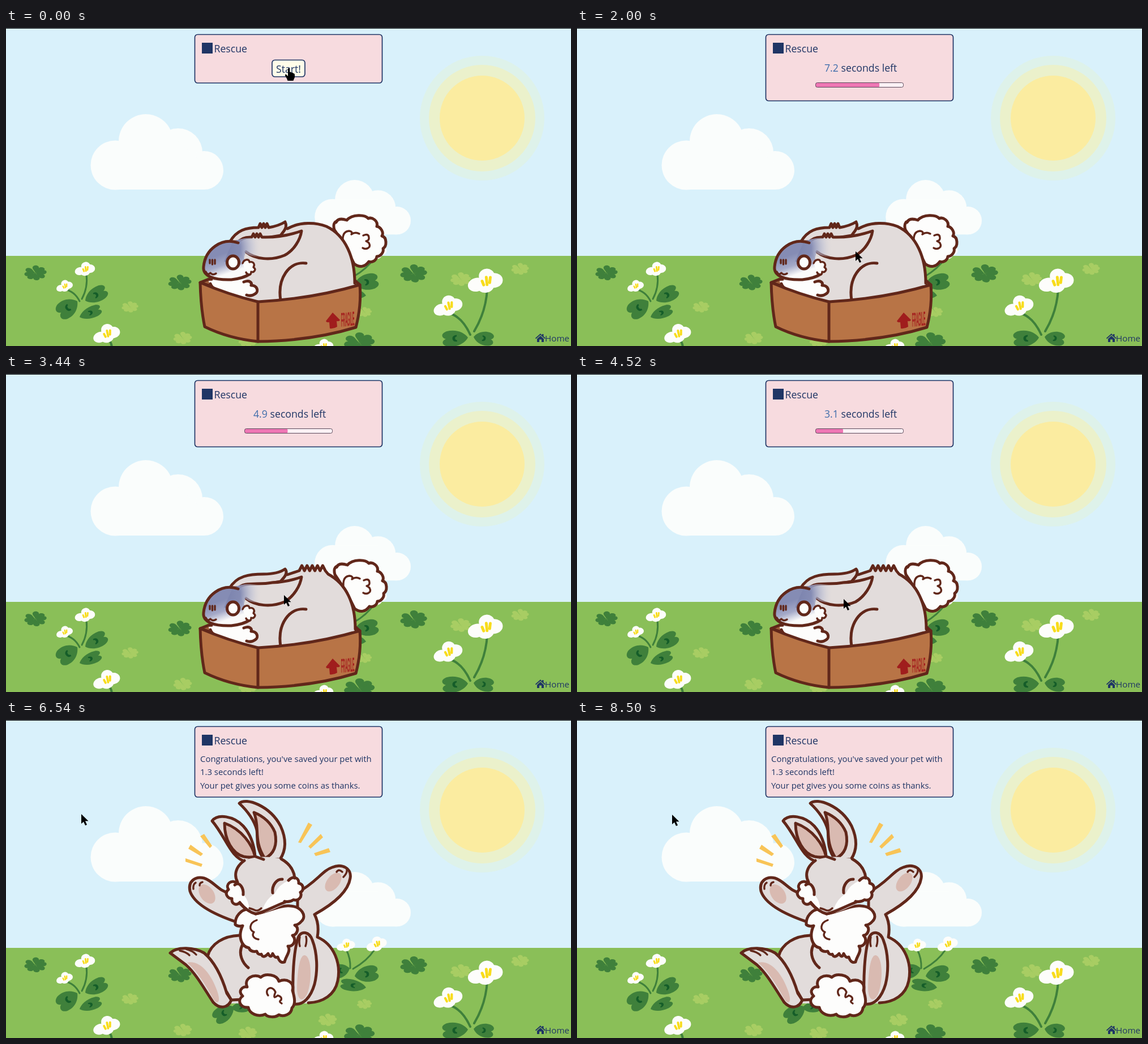
These frames come from a looping animation (998x561 px, 8560 ms). An HTML page:

```html
<!DOCTYPE html>
<html lang="en">
<head>
<meta charset="utf-8">
<title>Rescue</title>
<style>
html, body { margin: 0; width: 100%; height: 100%; overflow: hidden; background: #d9f1fb; }
svg { display: block; width: 998px; height: 561px; }
text { font-family: "Open Sans", "Noto Sans", sans-serif; font-size: 17.7px; fill: #1f3565; }
.small text { font-size: 14.9px; }
.ink, .ink path, .ink ellipse { stroke: #61271a; stroke-width: 5; stroke-linecap: round; stroke-linejoin: round; }
.ink .thin { stroke-width: 3.4; }
.ink .bare { stroke: none; }
.line { fill: none; }
.fur { fill: #e2dcdb; }
.white { fill: #fdfdfc; }
.pad { fill: #d9bab1; }
</style>
</head>
<body>
<svg viewBox="0 0 998 561">
  <defs>
    <g id="cloud" fill="#fafdfc">
      <circle cx="193" cy="242" r="43.5"/><circle cx="247" cy="200" r="48"/>
      <circle cx="304" cy="220" r="43"/><circle cx="350" cy="251" r="34"/>
      <path d="M193 200H304L350 240V285H193Z"/>
    </g>
    <path id="heart" d="M0 0C-4 -5 -11 -7 -9 -13C-7 -17 -1 -16 0 -12C1 -16 7 -17 9 -13C11 -7 4 -5 0 0Z"/>
    <path id="broad" d="M0 0C-6 -2 -11 -7 -9 -13C-7 -17 -2 -17 0 -14C2 -17 7 -17 9 -13C11 -7 6 -2 0 0Z"/>
    <g id="clover">
      <use href="#heart" transform="rotate(25)"/><use href="#heart" transform="rotate(105)"/>
      <use href="#heart" transform="rotate(195)"/><use href="#heart" transform="rotate(280)"/>
    </g>
    <g id="flower">
      <g fill="#fdfdfb">
        <ellipse cx="-16" cy="3" rx="15.5" ry="12" transform="rotate(-8)"/>
        <ellipse cx="16" cy="1" rx="15.5" ry="13"/>
        <ellipse cx="4" cy="-8" rx="14" ry="13"/>
        <ellipse cx="0" cy="9" rx="15" ry="12"/>
      </g>
      <path d="M-5 0L-3 7M3 -6V7M10 -5L8 4" fill="none" stroke="#f8dc1c" stroke-width="5" stroke-linecap="round"/>
    </g>
    <radialGradient id="blush" gradientUnits="userSpaceOnUse" cx="386" cy="388" r="66">
      <stop offset="0" stop-color="#7a82ad"/>
      <stop offset=".42" stop-color="#858cb4"/>
      <stop offset=".75" stop-color="#b9bdd3" stop-opacity=".5"/>
      <stop offset="1" stop-color="#e2dcdb" stop-opacity="0"/>
    </radialGradient>
    <linearGradient id="face" gradientUnits="userSpaceOnUse" x1="378" y1="400" x2="392" y2="440">
      <stop offset="0" stop-color="#858cb4"/>
      <stop offset=".45" stop-color="#a5aac8"/>
      <stop offset=".85" stop-color="#fafafa"/>
    </linearGradient>
  </defs>

  <rect width="998" height="561" fill="#d9f1fb"/>
  <g>
    <circle cx="841" cy="159" r="110" fill="#def2ea"/>
    <circle cx="841" cy="159" r="94" fill="#ebf1cb"/>
    <circle cx="841" cy="159" r="75" fill="#fbeca0"/>
  </g>
  <use href="#cloud"/>
  <use href="#cloud" transform="translate(437 158) scale(.724)"/>
  <rect y="402" width="998" height="159" fill="#8abf58"/>
  <g id="meadow"></g>

  <g id="boxed" class="ink">
    <g id="tail">
      <path class="white" d="M580 355C576 342 585 338 583 342C586 334 596 336 602 338C612 327 634 328 640 335C646 332 658 339 655 349C662 350 668 360 664 366C673 368 673 384 666 388C668 395 661 402 655 402C654 410 646 413 641 411C634 421 624 422 615 415L600 385Z"/>
      <path class="line thin" d="M595 374Q594 358 606 357Q613 358 610 363Q617 358 624 362M631 365Q640 361 641 368Q642 374 636 375Q644 378 642 385Q637 391 630 387"/>
    </g>
    <path d="M343 449L358 443L616 445L625 453L445 483Z" fill="#9b5d3a"/>
    <path class="fur bare" d="M397 378L435 365L497 354C522 342 548 343 566 350C600 366 616 405 616 455L600 475L440 485L360 455Z"/>
    <path id="back" class="line"/>
    <path class="line" d="M485 480C479 442 500 411 530 415"/>
    <path id="farEar" class="fur"/>
    <path class="white bare" d="M358 446L424 443Q434 447 433 453C448 456 446 470 432 473L400 476L361 460Z"/>
    <path class="line" d="M361 451Q363 457 369 460M420 448C430 444 435 449 433 454C444 454 447 465 440 469Q433 474 425 471"/>
    <path class="bare" d="M409 378C380 372 352 392 350 422C348 438 368 446 400 444Q420 441 432 432L420 405Z" fill="url(#face)"/>
    <path id="nearEar" class="fur"/>
    <path class="bare" d="M400 378Q420 366 452 373L454 404Q430 404 423 396L417 418L385 412Z" fill="url(#blush)"/>
    <path class="line" d="M410 379C381 369 352 390 349 421C347 438 368 445 398 444Q418 442 431 434"/>
    <path class="white thin" d="M418 415C421 407 430 407 430 413C438 411 440 418 437 422C443 426 438 432 433 430C433 437 426 436 424 431"/>
    <ellipse cx="401" cy="413.5" rx="10.5" ry="11.5" class="white"/>
    <path class="line thin" d="M360 409V415M364.500 409V417M369 409V416M353 430Q356 437 361 432Q365 437 371 433"/>
    <path d="M343 449Q344 494 351 527Q394 548 445 553Q540 552 618 528Q628 490 625 453Q540 478 445 483Q392 470 343 449Z" fill="#b87446"/>
    <path class="line" d="M445 483V553"/>
    <path class="bare" d="M577 502L590 515Q589 518 584 517L585 527Q579 531 572 530L571 519Q566 520 565 517Z" fill="#a01d1d"/>
    <text class="bare" transform="matrix(.54 -.06 .05 3.500 592 527)" style="font:bold 10px 'Liberation Sans',sans-serif;fill:#a5201f;stroke:none">FRAGILE</text>
  </g>

  <g id="freed" class="ink">
    <path fill="#f8c457" class="bare" d="M343 205L350 201L364 222L360 226ZM326 220L348 236L344 240L322 227ZM317 244L347 254L345 259L317 250ZM534 181L541 185L521 217L516 216ZM556 201L560 207L538 227L534 223ZM570 226L573 233L547 240L544 235Z"/>
    <path class="fur" d="M409 357C370 344 333 326 325 302C321 284 335 275 350 279C366 284 376 302 394 305L430 340Z"/>
    <path class="fur" d="M515 304C548 287 558 266 576 260C595 252 611 263 608 279C604 305 574 327 545 343L515 350Z"/>
    <ellipse class="pad bare" cx="355" cy="307" rx="12" ry="19" transform="rotate(-35 355 307)"/>
    <ellipse class="pad bare" cx="578" cy="286" rx="11" ry="19" transform="rotate(38 578 286)"/>
    <path class="line thin" d="M331 298Q330 290 335 287M342 292Q342 287 347 286M584 268Q588 262 594 268M596 277Q603 270 602 264"/>
    <path class="fur bare" d="M410 350L545 340C553 360 552 375 550 383C580 395 592 430 586 460C582 490 555 500 530 500L395 500C370 450 355 425 356 415C362 395 385 380 412 380Z"/>
    <path class="line" d="M545 343Q554 360 550 383C580 396 592 430 586 460C581 485 560 498 534 499M412 380C385 381 362 394 356 417M418 396C409 412 418 429 428 437"/>
    <path class="fur" d="M290 411C302 399 333 401 350 411C370 428 382 455 390 482L398 494C392 509 377 510 366 498C350 474 336 448 318 432Q302 420 290 411Z"/>
    <path class="pad bare" d="M320 428C342 423 362 447 373 478C380 498 374 504 366 492C352 466 338 444 320 428Z"/>
    <path class="line thin" d="M307 407Q318 409 324 415M318 404Q330 407 336 414"/>
    <path class="line" d="M390 480L398 494L416 493"/>
    <path class="fur" d="M508 500C505 458 508 408 516 384C522 370 536 374 541 388C550 411 551 442 545 466C538 490 525 503 510 501Z"/>
    <path class="pad bare" d="M528 415C540 418 541 460 532 483C524 500 513 495 514 468C515 445 518 414 528 415Z"/>
    <path class="line thin" d="M519 383Q517 392 519 399M530 382Q532 390 529 399"/>
    <path class="white" d="M418 487C409 479 417 469 426 471C419 456 439 446 450 454C458 446 479 449 482 461C496 455 510 463 506 477C510 490 512 501 505 508C504 520 490 524 482 520C475 526 461 524 458 519C445 525 430 518 428 507C413 508 408 494 418 487Z"/>
    <path class="line thin" d="M463 486C455 475 470 466 476 480C471 492 475 490 480 486Q488 488 486 494Q481 497 487 500"/>
    <path class="white" d="M405 361C404 346 416 334 427 334L441 342C462 339 484 326 502 328C522 329 532 346 522 355Q517 361 510 362C519 367 514 379 506 380C514 388 508 400 498 399C504 407 494 417 492 427Q484 430 480 418Q475 421 471 412Q468 422 463 412Q454 422 451 413Q445 415 443 408Q432 410 429 402C416 400 409 382 418 363Q410 365 405 361Z"/>
    <path class="line thin" d="M443 353C429 358 429 371 438 374C433 381 439 386 446 387"/>
    <path class="fur" d="M424 250C396 243 389 207 364 178C374 165 402 169 419 187Q437 207 440 240Z"/>
    <path class="pad" d="M386 182C386 212 400 236 420 241Q431 243 440 241C435 220 417 193 386 182Z"/>
    <path class="fur" d="M455 245C441 225 445 210 443 194C438 176 426 160 412 147C424 136 466 151 485 187C496 211 494 231 484 246Z"/>
    <path class="pad" d="M438 163C449 190 436 212 457 244C473 237 480 221 475 198Q465 174 438 163Z"/>
    <path class="fur bare" d="M421 247Q452 237 486 245C502 254 512 270 510 285L515 308L500 323C480 328 460 344 441 341Q420 333 405 318L400 298L409 288C402 270 408 256 421 247Z"/>
    <path class="white bare" d="M409 288C398 280 389 290 393 299C386 305 391 315 399 315C398 325 408 328 414 322Q419 332 430 336Q429 318 420 309ZM453 334Q460 315 474 307Q482 290 500 283C507 274 518 278 517 288C525 290 526 300 520 304C524 312 516 320 508 317Q502 322 493 321Z"/>
    <path class="line" d="M441 241L455 246M421 248C404 260 403 275 409 286M486 245C502 254 509 267 510 279M413 322Q427 339 441 342C458 339 474 328 494 321"/>
    <path class="line" d="M409 288C398 280 387 290 393 299C385 305 391 315 399 315C398 325 407 328 413 322M499 283C507 274 518 278 517 288C527 290 526 301 520 304C524 312 516 320 508 317Q501 322 492 320"/>
    <path class="line" d="M404 291C413 284 420 297 419 308M471 305C469 291 479 280 488 281"/>
    <path class="line thin" d="M430 332Q437 334 441 336Q446 337 451 332"/>
  </g>

  <rect id="panel" x="333.500" y="11.500" width="331" rx="5" fill="#f7dbdf" stroke="#1f3565" stroke-width="1.700"/>
  <rect x="346" y="26" width="19" height="19" fill="#1f3565"/>
  <text x="367.500" y="43">Rescue</text>
  <g id="intro">
    <rect x="470" y="56.500" width="58" height="29.500" rx="5" fill="#fffde9" stroke="#1f3565" stroke-width="1.700"/>
    <text x="499" y="79" text-anchor="middle">Start!</text>
  </g>
  <g id="timer">
    <text x="437" y="77"><tspan id="count" fill="#3f6dab"></tspan> seconds left</text>
    <rect x="421.500" y="96.500" width="155" height="8" rx="3" fill="#fbf1f5"/>
    <rect id="bar" x="421.500" y="96.500" height="8" rx="2.500" fill="#ee76b4"/>
    <rect x="421.500" y="96.500" width="155" height="8" rx="3" fill="none" stroke="#5b4a5c"/>
  </g>
  <g id="outro" class="small">
    <text x="343" y="74">Congratulations, you've saved your pet with</text>
    <text x="343" y="97">1.3 seconds left!</text>
    <text x="343" y="120.500">Your pet gives you some coins as thanks.</text>
  </g>

  <path d="M935 547L944 539L947 542V540H949.500V544L953 547L952 548.500L944 541.500L936 548.500ZM938 548.500L944 543L950 548.500V554H946V549.500H942V554H938Z" fill="#1f3565"/>
  <text x="952" y="553" style="font-size:15.200px">Home</text>
  <rect width="998" height="1" fill="#000"/>

  <g id="cursor">
    <path id="arrow" d="M0 0V17L4 13.500L7 20L10 18.800L7 12.300H12.500Z"/>
    <path id="hand" d="M-1.500 1Q0 -1.500 1.500 1V7Q4 5.500 5 8Q7 7 8 9Q10.500 8.500 10.500 11.500V16Q9 19 8 22H-2Q-3 18 -6 14Q-7.500 10 -4.500 11L-1.500 14Z"/>
  </g>
</svg>
<script>
const LOOP = 8560, CLICK = 280, BRISTLE = 2700, FREED = 5620;
const $ = id => document.getElementById(id);

const DARK = "#3f803b", LIGHT = "#a8cd63";
const use = (id, x, y, sx, sy, rot, fill) =>
  `<use href="#${id}" fill="${fill}" transform="translate(${x} ${y}) rotate(${rot}) scale(${sx} ${sy})"/>`;
const clover = (x, y, s, fill) => use("clover", x, y, s, s * .66, 0, fill);
const flower = (x, y, s, rot = -6) => use("flower", x, y, s, s, rot, "none");
const leaf = (x, y, rot, sx, sy) => use("broad", x, y, sx, sy, rot, DARK) +
  `<path transform="translate(${x} ${y}) rotate(${rot}) scale(${sx} ${sy})" d="M-3 -7Q-3 -9 0 -9Q3 -9 3 -7" fill="none" stroke="#155d29" stroke-width="1.7"/>`;
const stem = (d, w) => `<path d="${d}" fill="none" stroke="${DARK}" stroke-width="${w}" stroke-linecap="round"/>`;

$("meadow").innerHTML = [
  ...[[52, 432, 1.2], [307, 449, 1.25], [720, 433, 1.45], [624, 555, 1.65]].map(c => clover(...c, DARK)),
  ...[[219, 492, .9], [312, 547, 1], [427, 552, 1], [568, 529, 1], [633, 501, .8], [803, 443, 1.1], [908, 425, .95]].map(c => clover(...c, LIGHT)),
  stem("M103 461Q121 464 130 482M142 434Q145 458 134 478", 3),
  leaf(140, 481, 62, 1.4, 2.6), leaf(126, 482, 235, 1.7, 2.5), leaf(130, 510, 68, 1.1, 2.5),
  flower(139, 425, .58), flower(103, 455, .48, -12),
  stem("M601 405Q609 421 608 438M651 405Q638 425 613 439", 3),
  leaf(616, 452, 80, 1.5, 2.6), leaf(636, 472, 279, 1.1, 2.8), leaf(607, 438, 255, 1.3, 2),
  leaf(402, 506, 236, 1.5, 2.5), leaf(398, 508, 85, 1, 2),
  flower(600, 397, .53), flower(654, 395, .6, -14),
  stem("M783 503Q806 510 820 541M850 460Q848 500 827 535", 4),
  leaf(816, 546, 266, 1.5, 2.8), leaf(826, 545, 98, 1.3, 2.2),
  flower(846, 446, 1), flower(780, 490, .84, -12),
  stem("M180 548Q186 554 187 563", 4),
  flower(177, 539, .78, -12), flower(560, 561, .58)
].join("");

// Line of small spikes from a point, alternating up and down
const spikes = (n, dx, h) => Array.from({ length: n }, (_, i) => `l${dx} ${i % 2 ? h : -h}`).join("");
const poses = [
  {
    back: "M497 354C520 341 548 343 566 350C600 366 616 405 616 450",
    far: `M395 378C407 356 425 352 446 352${spikes(6, 3, 7)}Q482 349 493 342Q497 350 491 358L485 366L430 375Z`,
    near: `M409 379Q417 368 434 369${spikes(6, 3, 6)}C480 370 505 364 522 358C520 373 509 392 492 401C468 411 440 408 424 395`,
    tail: [0, 1]
  },
  {
    back: `M497 354L518 347${spikes(10, 4.6, 9)}L569 353C601 370 617 405 617 450`,
    far: "M395 378C407 356 430 353 455 353Q480 353 493 344Q498 350 491 359L485 366L430 375Z",
    near: "M409 379C420 365 445 373 470 368C492 367 508 363 522 358C520 373 509 392 492 402C468 412 440 409 424 396",
    tail: [1, -1]
  }
];

function setPose(p) {
  $("back").setAttribute("d", p.back);
  $("farEar").setAttribute("d", p.far);
  $("nearEar").setAttribute("d", p.near);
  $("tail").setAttribute("transform", `translate(${p.tail})`);
}

// time, x, y of the pointer tip
const path = [
  [0, 499.500, 71], [380, 499.500, 72], [900, 494, 388], [1500, 490, 396], [2000, 492, 394],
  [2700, 493, 392], [3440, 491, 390], [4000, 482, 394], [4520, 471, 397], [5100, 467, 400],
  [5660, 464, 402], [5950, 464, 402], [6450, 133, 166], [6600, 133, 166], [7300, 168, 167], [LOOP, 168, 167]
];

function pointerAt(t) {
  const i = path.findIndex(k => k[0] > t);
  const [a, b] = [path[i - 1], path[i]];
  const u = (t - a[0]) / (b[0] - a[0]), e = u * u * (3 - 2 * u);
  return [a[1] + (b[1] - a[1]) * e, a[2] + (b[2] - a[2]) * e];
}

const show = (id, on) => { $(id).style.display = on ? "" : "none"; };

function draw(t) {
  const running = t >= CLICK && t < FREED, freed = t >= FREED;
  const left = Math.min(10, 7.22 - (t - 2000) * .00163);
  show("intro", t < CLICK);
  show("timer", running);
  show("outro", freed);
  show("boxed", !freed);
  show("freed", freed);
  $("panel").setAttribute("height", freed ? 124.5 : running ? 117 : 85.5);
  $("count").textContent = left.toFixed(1);
  $("bar").setAttribute("width", Math.max(0, 15.6 * left));
  setPose(poses[t < BRISTLE ? 0 : 1]);
  const [x, y] = pointerAt(t);
  $("cursor").setAttribute("transform", `translate(${x.toFixed(1)} ${y.toFixed(1)})`);
  show("hand", t < CLICK);
  show("arrow", t >= CLICK);
}

const start = performance.now();
function tick() {
  draw((performance.now() - start) % LOOP);
  requestAnimationFrame(tick);
}
tick();
</script>
</body>
</html>
```
